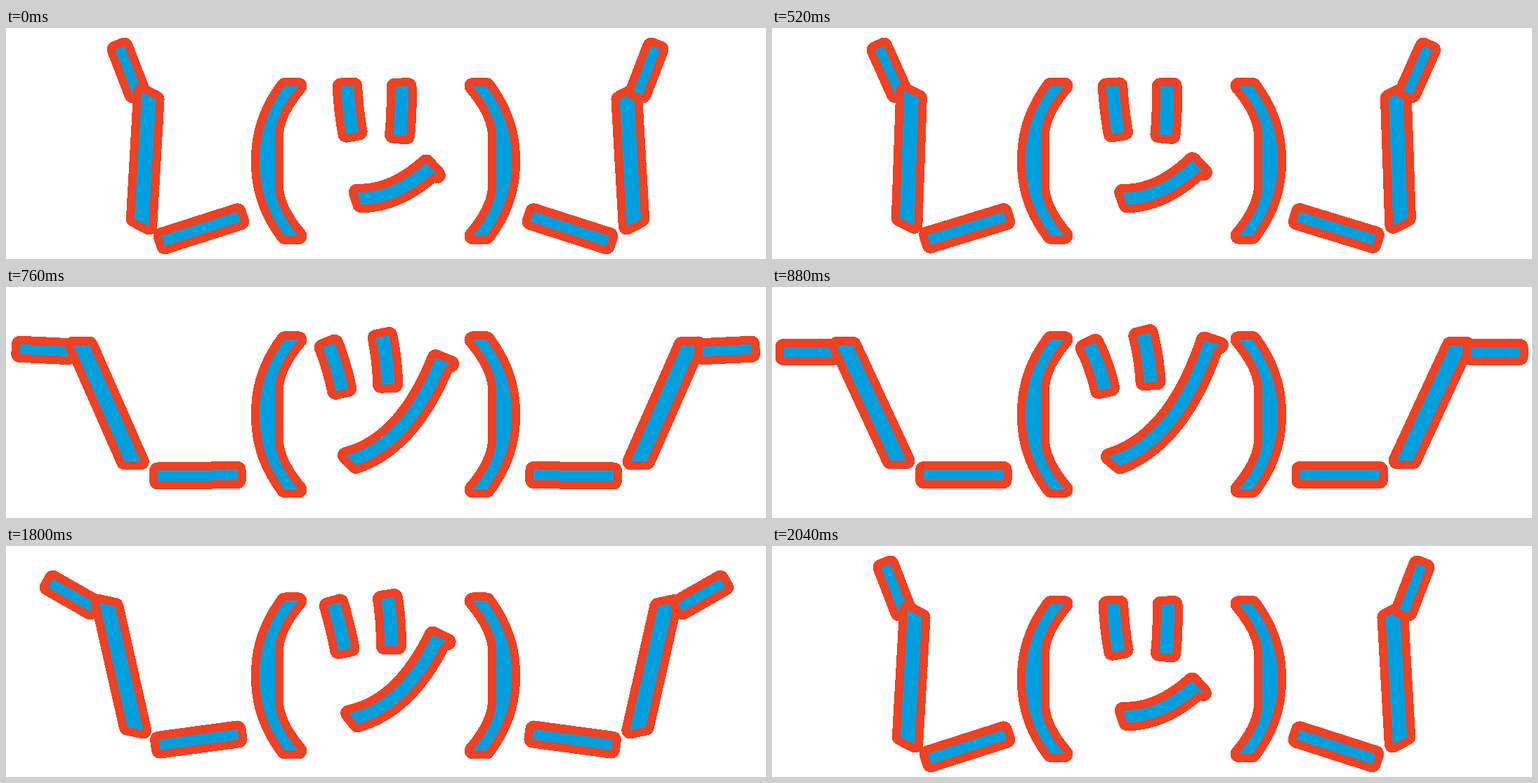
An HTML page for the animation above (2120 ms loop, 1082 px wide and 330 px high).

```html
<!DOCTYPE html>
<html lang="en">
<head>
<meta charset="utf-8">
<title>Shrug</title>
<style>
  html, body { margin: 0; width: 100%; height: 100%; overflow: hidden; background: #fff; }
  svg { display: block; width: 100%; height: 100%; shape-rendering: crispEdges; }
  path { fill: #009fdd; stroke: #ef4123; stroke-width: 24; stroke-linejoin: round; paint-order: stroke; }
</style>
</head>
<body>
<svg id="stage" viewBox="0 0 1082 330"></svg>
<script>
const LOOP = 2120, STEP = 40, WIDTH = 1081;
const stage = document.getElementById('stage');

const clamp = x => Math.min(1, Math.max(0, x));
const smooth = x => x * x * (3 - 2 * x);
const mix = (a, b, k) => a + (b - a) * k;
const range = (from, to, n = 20) => Array.from({ length: n + 1 }, (_, i) => mix(from, to, i / n));
const mirror = (points, sum) => points.map(([x, y]) => [sum - x, y]);

// cubic-bezier(.33, 0, .03, 1), solved by bisection
function snap(x) {
  let lo = 0, hi = 1;
  for (let i = 0; i < 30; i++) {
    const t = (lo + hi) / 2, r = 1 - t;
    if (.99 * t * r * r + .09 * t * t * r + t * t * t < x) lo = t; else hi = t;
  }
  return x >= 1 ? 1 : smooth(lo);
}

// Parallelogram reaching from a joint along `reach`, with end edges parallel to `cap`
function slab([rx, ry], [cx, cy], degrees, [x, y]) {
  const c = Math.cos(degrees * Math.PI / 180), s = Math.sin(degrees * Math.PI / 180);
  return [[0, -.5], [0, .5], [1, .5], [1, -.5]].map(([r, k]) => {
    const px = r * rx + k * cx, py = r * ry + k * cy;
    return [x + px * c - py * s, y + px * s + py * c];
  });
}

// Point at offset `side` from a quadratic curve
function beside([a, q, b], t, side) {
  const point = i => mix(mix(a[i], q[i], t), mix(q[i], b[i], t), t);
  const slope = i => mix(q[i] - a[i], b[i] - q[i], t);
  const dx = slope(0), dy = slope(1), len = Math.hypot(dx, dy);
  return [point(0) - dy / len * side, point(1) + dx / len * side];
}

// Brush stroke along a curve; `skew` slants the start, `nib` overhangs the end
function brush(curve, { width, skew = 0, nib = 0 }) {
  const half = width / 2;
  return [
    ...range(-skew, 1).map(t => beside(curve, t, -half)),
    beside(curve, 1, half + nib),
    ...range(1 - skew, skew).map(t => beside(curve, t, half))
  ];
}

// Start, control and end of each stroke in both poses
const features = {
  eyeL: { width: 18.5, blink: 117,
    shrug: [[452, 83], [466.5, 112], [474, 146]], happy: [[486, 83], [487.5, 116], [493.5, 150]] },
  eyeR: { width: 19, blink: 118,
    shrug: [[528.5, 67.5], [537, 101], [539, 135.5]], happy: [[563, 83.5], [564, 118], [560.5, 153.5]] },
  mouth: { width: 17.5, skew: .028, nib: 6,
    shrug: [[487.5, 249], [577, 218.5], [624, 78.5]], happy: [[502.5, 243.5], [554.5, 244], [604, 199]] }
};

// Bracket edges are power curves; the inner one is straight in the middle
function bracket(lift) {
  const edge = (from, to, x, depth, flat, power) => range(from, to, 40).map(v =>
    [x + depth * Math.max(0, (Math.abs(v) - flat) / (1 - flat)) ** power, 182 + 8 * lift + 107 * v]);
  return [...edge(-1, 1, 361, 36, 0, 2.2), ...edge(1, -1, 383, 33.5, .34, 1.8)];
}

function limbs(p) {
  const bow = p * (1 - p), shift = WIDTH + 6 * p;
  return {
    hand: [slab([-69.5, 0], [0, 14], 69 * p, [86 + 101 * p - 25 * bow, 93 - 23 * bow]), shift],
    arm: [slab([-76.3, -165], [23, 0], 28.1 * p, [180 + 13 * p - 6.5 * bow, 248 + 30 * p]), shift],
    forearm: [slab([-113.5, 0], [0, 15], -17.8 * p, [329.5 + 2.5 * p, 268.5 + p]), WIDTH],
    bracket: [bracket(p), WIDTH]
  };
}

const parts = {};
for (const name of ['handL', 'armL', 'forearmL', 'bracketL', ...Object.keys(features),
  'bracketR', 'forearmR', 'armR', 'handR']) {
  parts[name] = stage.appendChild(document.createElementNS('http://www.w3.org/2000/svg', 'path'));
}
function set(name, points) {
  const d = points.map(p => p.map(v => v.toFixed(2)).join()).join('L');
  parts[name].setAttribute('d', 'M' + d + 'Z');
}

function draw(t) {
  const down = clamp((t - 480) / 400);
  const up = smooth(clamp((t - 1600) / 440));
  const lift = 1 - snap(down) + up;
  const smile = 1 - smooth(down) + up;
  const open = 1 - .92 * Math.sin(Math.PI * clamp(t / 240)) ** 2;

  for (const [name, [points, sum]] of Object.entries(limbs(lift))) {
    set(name + 'L', points);
    set(name + 'R', mirror(points, sum));
  }
  for (const [name, { shrug, happy, blink, ...style }] of Object.entries(features)) {
    const curve = shrug.map((p, i) => p.map((v, axis) => mix(v, happy[i][axis], smile)));
    const points = brush(curve, style);
    set(name, blink ? points.map(([x, y]) => [x, mix(y, blink, 1 - open)]) : points);
  }
}

const start = performance.now();
function tick() {
  const t = (performance.now() - start) % LOOP;
  // Motion advances in whole steps; squinting eyes only apply before the shrug
  draw(Math.floor(t / STEP) * STEP);
  requestAnimationFrame(tick);
}
tick();
</script>
</body>
</html>
```
